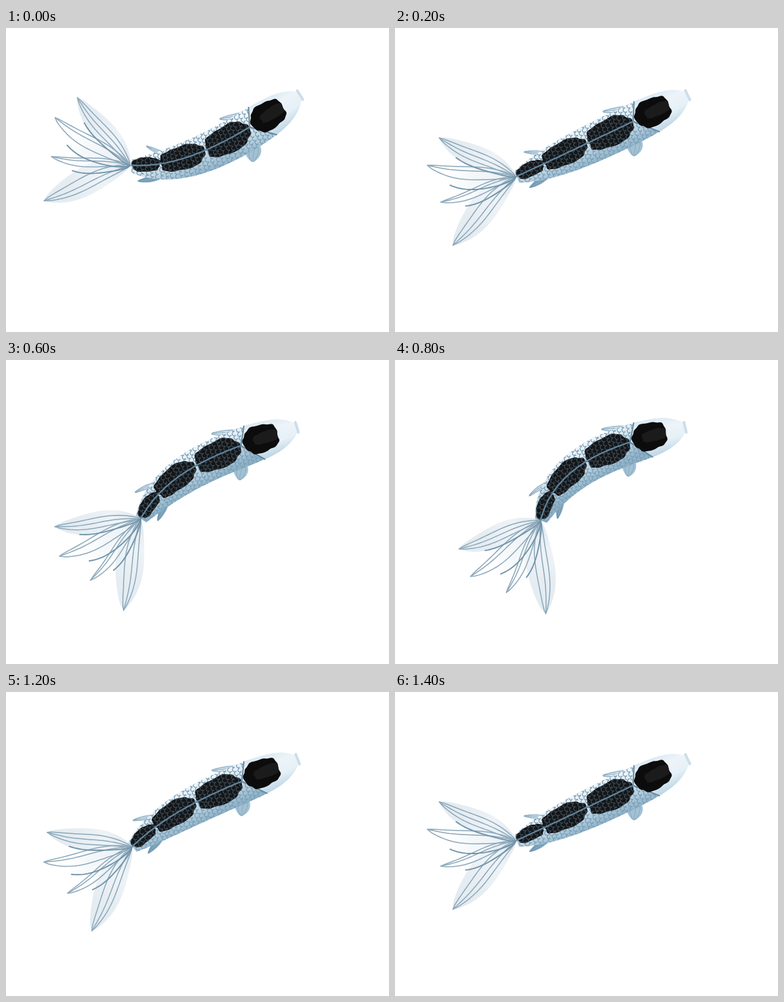
These frames come from a looping animation (583x463 px, 1.6 s). An HTML page with a canvas:

```html
<!DOCTYPE html>
<html>
<head>
<meta charset="utf-8">
<style>
html, body { margin: 0; width: 100%; height: 100%; overflow: hidden; background: #fff; }
canvas { display: block; }
</style>
</head>
<body>
<canvas id="stage" width="583" height="463"></canvas>
<script>
const ctx = document.getElementById('stage').getContext('2d');
const { sin, cos, PI, abs, exp, min, max, sign } = Math;
const RAD = PI / 180, STEP = 200, POSES = 4, JOINT = 288;
const range = (n, f) => Array.from({ length: n }, (_, i) => f(i));
const noise = i => abs(sin(i * 127.1) * 43758.5) % 1;

// The fish lives in (s, n): distance from the mouth along the spine, height above it.
let bend, spine;
const heading = s => RAD * (25.5 + bend * (28 * (max(0, min(s, 275)) / 258) ** 2.5 - 7));

function pose(k) {
  bend = 2.75 * (k / POSES) ** 0.75 - 1;
  const squash = 1 - 0.02 * bend * bend;
  let x = 444.5 - 2.2 * bend, y = 102.7;
  spine = range(JOINT / 2 + 1, i => {
    const p = [x, y], a = heading(2 * i + 1);
    x -= 2 * cos(a) * squash;
    y += 2 * sin(a);
    return p;
  });
}

function at([s, n]) {
  const i = max(0, min(JOINT / 2, Math.floor(s / 2)));
  const [x, y] = spine[i], a = heading(s), rest = s - 2 * i;
  return [x - rest * cos(a) - n * sin(a), y + rest * sin(a) - n * cos(a)];
}

function trace(points, path = new Path2D()) {
  points.forEach((p, i) => i ? path.lineTo(...at(p)) : path.moveTo(...at(p)));
  return path;
}
function fill(path, color) {
  ctx.fillStyle = color;
  ctx.fill(path);
}
function stroke(path, color, width) {
  ctx.strokeStyle = color;
  ctx.lineWidth = width;
  ctx.stroke(path);
}
function within(path, draw) {
  ctx.save();
  ctx.clip(path);
  draw();
  ctx.restore();
}
function blend(from, to, ...colors) {
  const g = ctx.createLinearGradient(...at(from), ...at(to));
  colors.forEach((c, i) => g.addColorStop(i / (colors.length - 1), c));
  return g;
}

// Body edge on the upper (1) or lower (-1) side.
function edge(s, side) {
  const full = side > 0 ? 6 + 21 * (1 - exp(-s / 22)) : 6.5 + 27.5 * (1 - exp(-s / 26));
  return [s, side * full * (1 - (s / 310) ** 5)];
}
const side = (from, to, dir) => range(41, i => edge(from + (to - from) * i / 40, dir));

function blob(s, n, rs, rn, path) {
  const round = v => sign(v) * abs(v) ** 0.8;
  return trace(range(61, i => {
    const a = i / 60 * 2 * PI, r = 1 + 0.04 * sin(5 * a + s) + 0.025 * sin(11 * a + n);
    return [s + rs * r * round(cos(a)), n + rn * r * round(sin(a))];
  }), path);
}

// A leaf whose rays run from root to tip; k goes from -1 to 1 across it.
function leaf(s, n, angle, len, up, down, root = 0.25, wave = 0) {
  const c = cos(angle * RAD), d = sin(angle * RAD);
  const ray = (k, end = 1) => range(25, i => {
    const t = i / 24 * end;
    const w = k * (k > 0 ? up : down) * max(0, sin(PI * (root + (1 - root) * t))) ** 0.7
      + wave * sin(2 * PI * t);
    return [s + len * t * c - w * d, n + len * t * d + w * c];
  });
  return { ray, tip: ray(0)[24], shape: trace([...ray(1), ...ray(-1).reverse()]) };
}

function fin(color, ink, ...size) {
  const { ray, shape } = leaf(...size);
  fill(shape, color);
  for (const k of [-0.6, 0, 0.6]) stroke(trace(ray(k, 0.95)), ink, 1.2);
}

function drawTail() {
  const lobe = (...size) => leaf(JOINT, 0, ...size, 0, 2);
  const inner = [lobe(32, 136, 14, 30), lobe(6, 121, 10, 20)];
  const outer = [lobe(51.5, 131, 17, 17), lobe(-22.6, 142, 25, 18)];
  const root = [JOINT, 0];
  for (const l of inner) fill(l.shape, blend(root, l.tip, '#dfe8ee', '#eef3f7', '#f5f8fa', '#fff', '#fff'));
  for (const l of outer) fill(l.shape, blend(root, l.tip, '#dfe8ee', '#eef3f7', '#e6edf2', '#e2ebf0'));
  for (const l of [...inner, ...outer]) {
    for (const k of [0.45, 0, -0.45]) stroke(trace(l.ray(k)), '#8ba7b9', 1.5);
  }
  for (const l of [outer[0], ...inner]) stroke(trace(l.ray(-0.95, 0.72)), '#7193a9', 1.9);
}

function drawScales(clip, color) {
  const path = new Path2D();
  for (let i = 0; i < 32 * 12; i++) {
    const row = Math.floor(i / 12);
    const s = 64 + row * 7 + 2 * noise(i), n = (i % 12 - 6 + row % 2 / 2) * 6.5 + 2 * noise(i + 500);
    trace(range(7, j => [s + 4 * sin(j / 2), n + 3.5 * cos(j / 2)]), path);
  }
  within(clip, () => stroke(path, color, 1.3));
}

function drawFish(k) {
  pose(k);
  ctx.fillStyle = '#fff';
  ctx.fillRect(0, 0, 583, 463);
  ctx.lineCap = ctx.lineJoin = 'round';
  drawTail();

  fin('#dfebf3', '#8aabc0', 85, 20, 18, 45, 5, 7);
  fin('#e2edf4', '#86a7bc', 235, 15, 28, 31, 4, 4);
  fin('#82a8bf', '#7199b1', 242, -17, -11, 36, 4, 6);
  fin('#a3c1d3', '#8aaec4', 99, -28, -55, 25, 13, 11);

  const body = trace([...side(0, JOINT, 1), ...side(JOINT, 0, -1)]);
  fill(body, blend([175, 30], [175, -33], '#f2f8fb', '#dfebf3', '#b9d1e0', '#8db1c7'));
  drawScales(body, '#7c9fb6');

  const black = new Path2D();
  blob(130, 0, 37, 21, black);
  blob(206, 1, 36, 18, black);
  blob(264, 1, 22, 11, black);
  fill(black, '#141618');
  drawScales(black, '#3b4852');
  stroke(trace(range(50, i => [91 + i * 4, 0])), '#5f859e', 2.2);

  const neck = [91, 0], collar = [edge(77, 1), neck, edge(62, -1)];
  fill(trace([...side(0, 77, 1), neck, ...side(62, 0, -1)]),
    blend([48, 28], [48, -31], '#d9e8f2', '#edf4f9', '#e6f0f7', '#bdd6e5'));
  stroke(trace(collar), '#6389a3', 2);
  stroke(trace([[-1, 8], [-1, -8]]), '#cbdeea', 4);
  const cap = blob(58, 0, 28, 21);
  fill(cap, '#0c0c0c');
  within(cap, () => fill(blob(49, 0, 22, 9), '#1b1b1b'));
}

function tick(now) {
  const turn = Math.floor(now / STEP) % (2 * POSES);
  drawFish(POSES - abs(POSES - turn));
  requestAnimationFrame(tick);
}
requestAnimationFrame(tick);
</script>
</body>
</html>
```
